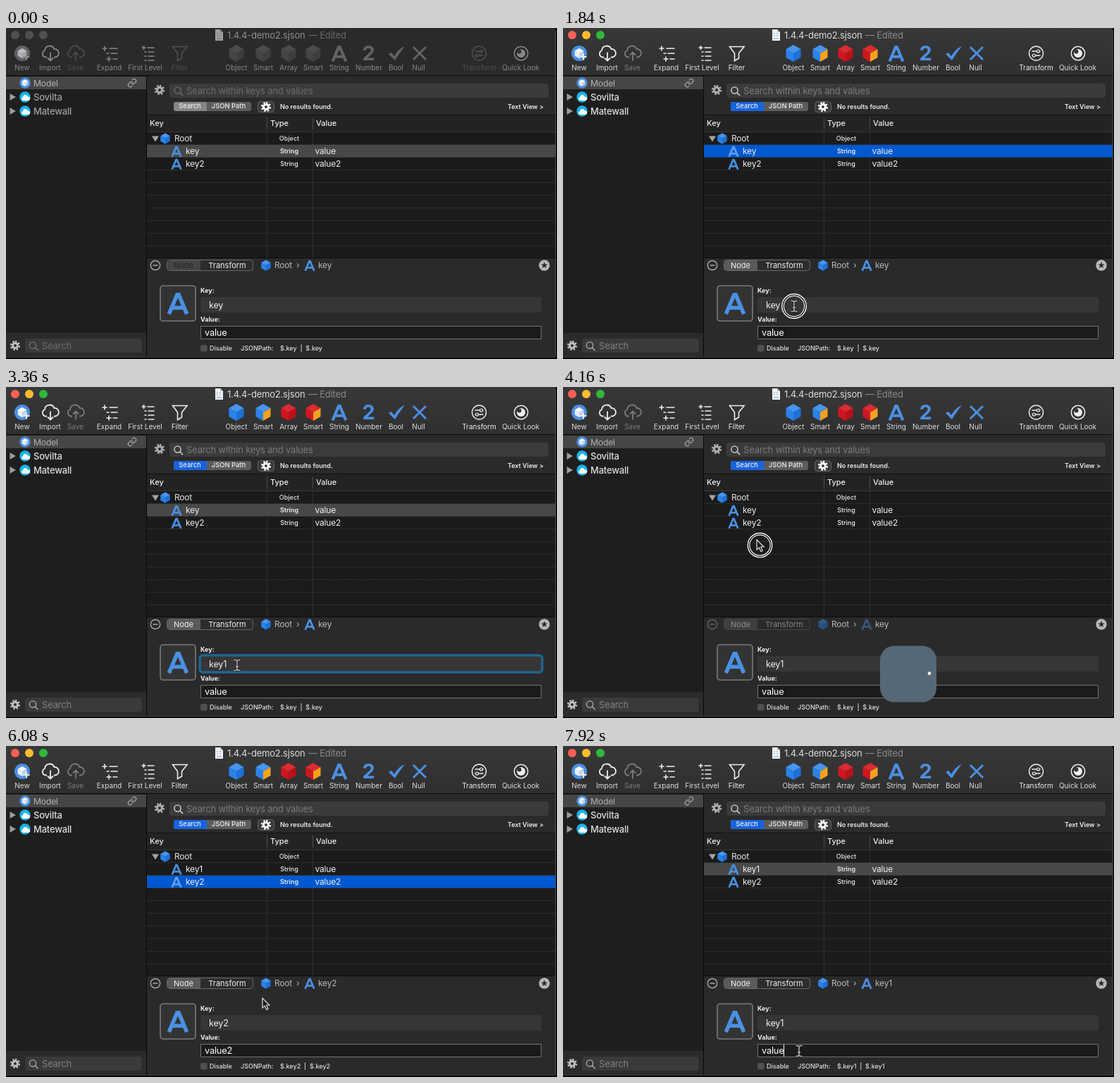
Animation, 782 px wide and 470 px high, one loop 8 s. Source, as an HTML page with a canvas:

```html
<!DOCTYPE html>
<html lang="en">
<head>
<meta charset="utf-8">
<title>Key editor</title>
<style>
html, body { margin: 0; width: 100%; height: 100%; overflow: hidden; background: #000; }
canvas { display: block; }
</style>
</head>
<body>
<canvas id="stage" width="782" height="470"></canvas>
<script>
const g = document.getElementById('stage').getContext('2d');
const LOOP = 8000, STEP = 80;
const BLUE = '#4a90e2', ROW = '#484848';
const CUBE_BLUE = ['#4596f0', '#2a83ea', '#1f70d8'];
const CUBE_RED = ['#dc2b31', '#d0161f', '#b8121a'];
const CUBE_GREY = ['#4b4b4b', '#444', '#3e3e3e'];

// Pointer stops: time, x, y
const STOPS = [
  [160, 427, 398], [640, 303.5, 175.5], [1040, 303.5, 175.5], [1760, 328, 395],
  [2560, 328, 395], [2960, 338, 392], [3360, 328, 395], [3600, 328, 395],
  [4000, 275, 217], [4160, 275, 217], [4480, 280, 187], [4960, 280, 187],
  [5280, 345, 413], [5440, 343, 422], [5680, 338, 400], [5840, 338, 400],
  [6720, 480, 170], [6960, 480, 170], [7600, 335, 433]
];
const CLICKS = [[800, 880], [1840, 2000], [4160, 4320], [4800, 4880], [6800, 6960], [7680, 7840]];
const BUSY = [[4160, 4400], [6880, 7120]];
const within = (t, spans) => spans.find(([a, b]) => t >= a && t < b);

// Drawing helpers
function rect(x, y, w, h, fill) {
  g.fillStyle = fill;
  g.fillRect(x, y, w, h);
}
function box(x, y, w, h, r, fill, edge, lw = 1) {
  g.beginPath();
  g.roundRect(x, y, w, h, r);
  if (fill) { g.fillStyle = fill; g.fill(); }
  if (edge) { g.strokeStyle = edge; g.lineWidth = lw; g.stroke(); }
}
function disc(x, y, r, fill, edge, lw = 1) {
  box(x - r, y - r, 2 * r, 2 * r, r, fill, edge, lw);
}
function shape(d, x, y, fill, edge, lw = 1) {
  const path = new Path2D(d);
  g.save();
  g.translate(x, y);
  if (fill) { g.fillStyle = fill; g.fill(path); }
  if (edge) { g.strokeStyle = edge; g.lineWidth = lw; g.stroke(path); }
  g.restore();
}
const pen = (d, x, y, color, lw) => shape(d, x, y, null, color, lw);
function text(s, x, y, size, color = '#e4e4e4', weight = 400, align = 'left') {
  g.font = `${weight} ${size}px Inter, "Liberation Sans", sans-serif`;
  g.letterSpacing = size > 11 ? '-0.2px' : '0px';
  g.textAlign = align;
  g.fillStyle = color;
  g.fillText(s, x, Math.round(y + size * 0.36));
  return g.measureText(s).width;
}
function faded(alpha, paint) {
  g.save();
  g.globalAlpha = alpha;
  paint();
  g.restore();
}

// Icons
function cube(x, y, r, [top, left, right]) {
  const w = r * 0.88, h = r / 2;
  shape(`M0 ${-r}L${w} ${-h}L0 0L${-w} ${-h}Z`, x, y, top);
  shape(`M${-w} ${-h}L0 0V${r}L${-w} ${h}Z`, x, y, left);
  shape(`M${w} ${-h}L0 0V${r}L${w} ${h}Z`, x, y, right);
}
function letterA(x, y, r, color = BLUE) {
  const k = r * 0.87;
  pen(`M${-k} ${r}L${-r * 0.08} ${-k}H${r * 0.08}L${k} ${r}M${-k * 0.55} ${r * 0.4}H${k * 0.55}`, x, y, color, r * 0.38);
}
function gear(x, y, r, color, hole) {
  g.save();
  disc(x, y, r * 0.72, color);
  g.setLineDash([2 * Math.PI * r * 0.84 / 16]);
  disc(x, y, r * 0.84, null, color, r * 0.36);
  g.restore();
  disc(x, y, r * 0.28, hole);
}
function lens(x, y, color) {
  disc(x - 1, y - 1, 4.6, null, color, 1.3);
  pen('M2.5 2.5L6.5 6.5', x, y, color, 1.5);
}
function modelIcon(x, y, r, color) {
  disc(x, y, r, color);
  cube(x, y, r * 0.65, ['#fff', '#e8eef6', '#c6d3e4']);
}
function remoteIcon(x, y) {
  disc(x, y, 7.7, '#1ab4e8');
  shape('M-4 4a2.6 2.6 0 0 1 0-5a3.6 3.6 0 0 1 7-.5a2.8 2.8 0 0 1 1 5.5Z', x + 1, y + 1, '#fff');
}
const CLOUD = 'M-5 5H-7a5 5 0 0 1-1-9.5a7 7 0 0 1 13.5-2a5.8 5.8 0 0 1 1.5 11.5H5';
const LINK = 'M-1.1 .5a2.8 2.8 0 0 0 4.2 .3l1.7-1.7a2.8 2.8 0 0 0-4-4l-1 1' +
  'M1.1-.5a2.8 2.8 0 0 0-4.2-.3l-1.7 1.7a2.8 2.8 0 0 0 4 4l1-1';

function toolbar(on) {
  const pick = (a, b) => on ? a : b;
  const fill = g.createLinearGradient(0, 0, 0, 67);
  fill.addColorStop(0, pick('#393839', '#2a2a2a'));
  fill.addColorStop(1, pick('#302f30', '#2a2a2a'));
  rect(0, 0, 780, 67, fill);
  rect(0, 67, 780, 1, '#0c0c0c');

  ['#ff5f57', '#febc2e', '#2fb93a'].forEach((c, i) => disc(13 + 20 * i, 10, 6, pick(c, '#505050')));
  shape('M-5-8H2L6-4V8H-5Z', 302, 10, pick('#f2f2f2', '#a0a0a0'));
  shape('M2-8V-4H6Z', 302, 10, pick('#b9c4d0', '#777'));
  pen('M-3-2h2M1-2h2M-3 1h2M1 1h2M-3 5h7', 302, 10, pick('#6e9fd6', '#666'), 1.2);
  text('1.4.4-demo2.sjson', 314, 10, 13, pick('#dcdcdc', '#8e8e8e'));
  text('— Edited', 429, 10, 13, pick('#8a8a8a', '#666'));

  const ink = pick('#eee', '#888'), dim = pick('#eee', '#505050'), off = pick('#7c7c7c', '#4c4c4c');
  const blue = pick(BLUE, '#636363');
  [['New', 23], ['Import', 62.5], ['Save', 98.5, off], ['Expand', 146.5], ['First Level', 197.5],
   ['Filter', 246.5, dim], ['Object', 327], ['Smart', 365], ['Array', 401], ['Smart', 436],
   ['String', 473], ['Number', 515], ['Bool', 553.5], ['Null', 585.5],
   ['Transform', 671.5, dim], ['Quick Look', 730.5]
  ].forEach(([s, x, c]) => text(s, x, 56, 10, c || pick('#dedede', '#888'), 400, 'center'));

  faded(pick(1, 0.6), () => modelIcon(23, 36, 11, pick(BLUE, '#888')));
  pen('M-4.5 0h9M0-4.5v9', 29, 41, ink, 2);
  pen(CLOUD + 'M0-2V10M-4 6L0 10L4 6', 63, 36.5, ink, 1.8);
  pen(CLOUD + 'M0 10V-2M-4 2L0-2L4 2', 99, 36.5, off, 1.8);
  pen('M-11-7h7M-7.5-10.5v7M-1-7h12M-5 0h4M1 0h10M-5 8h7M-1.5 4.5v7M4 8h7', 147.5, 36, ink, 1.6);
  pen('M-8-8h6M-5-11v6M0-8h10M-4-2h3M1-2h9M-4 4h3M1 4h9M-4 10h3M1 10h9', 200.5, 36, ink, 1.6);
  pen('M-10-9.5H10.5L3 0V7L-3 10.5V0Z', 246.5, 36, dim, 1.6);

  const mixed = base => [base[0], base[1], '#f5a11f'];
  cube(327, 36, 12, pick(CUBE_BLUE, CUBE_GREY));
  cube(365, 36, 12, pick(mixed(CUBE_BLUE), CUBE_GREY));
  cube(401, 36, 12, pick(CUBE_RED, CUBE_GREY));
  cube(436, 36, 12, pick(mixed(CUBE_RED), CUBE_GREY));
  letterA(473, 36.5, 10.8, blue);
  text('2', 514.5, 36, 29, blue, 700, 'center');
  shape('M-11 1L-7-1L-3 4C1-3 6-8 12-10C7-4 2 3-2 10Z', 554, 36, blue);
  pen('M-9-9L9 9M9-9L-9 9', 587, 36, blue, 3);

  disc(671.5, 36, 10, null, dim, 1.4);
  pen('M-6-3H6M-6 3H6', 671.5, 36, dim, 1.4);
  disc(674.5, 33, 2, '#333', dim, 1.2);
  disc(668.5, 39, 2, '#333', dim, 1.2);
  disc(731, 36, 9.7, null, ink, 1.5);
  disc(731, 36, 6, ink);
  disc(728.5, 33.5, 3, '#333');
}

function sidebar(on) {
  rect(0, 68, 199, 365, '#1e1e1e');
  rect(0, 69, 199, 18, '#464646');
  modelIcon(27, 78, 7.7, BLUE);
  text('Model', 39, 78.5, 12.2, '#b0b0b0');
  pen(LINK, 179, 78, '#a4a4a4', 1.3);
  ['Sovilta', 'Matewall'].forEach((s, i) => {
    const y = 98 + 20 * i;
    shape('M-3.5-5L5 0L-3.5 5Z', 9, y, '#9c9c9c');
    remoteIcon(27, y);
    text(s, 39, y + 0.5, 13, on ? '#dedede' : '#a0a0a0', 500);
  });
  rect(0, 433, 199, 34, '#2b2b2b');
  gear(13, 451, 7, '#c0c0c0', '#2b2b2b');
  box(27, 441, 166, 20, 4, '#3a3a3a');
  lens(39, 451.5, on ? '#b0b0b0' : '#777');
  text('Search', 51, 451, 13, on ? '#808080' : '#6c6c6c');
  rect(199, 68, 1, 399, '#080808');
}

function searchBar(on) {
  rect(200, 68, 580, 56, '#2a2a2a');
  gear(218, 88, 7.2, '#acacac', '#2a2a2a');
  box(232, 79, 538, 20, 4, '#3b3b3b');
  lens(244.5, 89.5, on ? '#e0e0e0' : '#707070');
  text('Search within keys and values', 256, 89.5, 13, on ? '#7a7a7a' : '#6c6c6c');
  box(238, 105, 110, 13, 3, '#5c5c5c');
  box(238, 105, 47, 13, [3, 0, 0, 3], on ? '#1763dd' : '#868686');
  text('Search', 261, 111, 9.4, '#f0f0f0', 500, 'center');
  text('JSON Path', 316, 111, 9.4, '#f0f0f0', 500, 'center');
  box(357.5, 104.5, 23, 15, 4, '#3a3a3a', '#666');
  gear(369, 112, 7, '#fff', '#3a3a3a');
  text('No results found.', 389, 112, 9, '#eee', 600);
  text('Text View >', 763, 112, 9, '#eee', 600, 'right');
}

function table(s) {
  rect(200, 124, 580, 202, '#1b1b1b');
  rect(200, 124, 580, 23, '#232323');
  rect(200, 123, 580, 1, '#111');
  rect(200, 147, 580, 1, '#383838');
  [['Key', 204], ['Type', 375], ['Value', 440]].forEach(([h, x]) => text(h, x, 135.5, 11, '#eee', 500));
  rect(370, 127, 1, 17, '#4c4c4c');
  rect(435, 127, 1, 17, '#4c4c4c');
  g.save();
  g.setLineDash([1, 1]);
  for (let y = 165.5; y < 320; y += 18) pen('M200 0H780', 0, y, '#3c3c3c', 1);
  g.restore();
  rect(370, 148, 1, 178, '#303030');
  rect(435, 148, 1, 178, '#303030');
  if (s.row) rect(200, 148 + 18 * s.row, 580, 17.5, s.blueRow ? '#0058d0' : ROW);

  shape('M-5-3.5H5L0 4.5Z', 212, 157, '#a4a4a4');
  cube(226, 157, 7.7, CUBE_BLUE);
  text('Root', 239, 157, 12);
  text('Object', 402, 157, 9, '#e4e4e4', 500, 'center');
  [[s.key1, 'value'], ['key2', 'value2']].forEach(([key, value], i) => {
    const y = 175 + 18 * i, picked = s.row === i + 1;
    letterA(242, y + 0.5, 7.3, picked && s.blueRow ? '#5f9df0' : BLUE);
    text(key, 255, y, 12, '#f0f0f0');
    text('String', 402, y, 9, '#f0f0f0', picked ? 600 : 500, 'center');
    text(value, 438.5, y, 12, '#f0f0f0');
  });
}

function caret(x, y) { rect(Math.round(x), y, 1, 17, '#fff'); }

function details(t, s) {
  const second = s.node === 2;
  const name = second ? 'key2' : s.key1;
  rect(200, 326, 580, 141, '#2a2a2a');
  rect(200, 326, 580, 1, '#0c0c0c');

  faded(s.busy ? 0.45 : 1, () => {
    disc(212, 337, 6.7, null, '#b8b8b8', 1.2);
    pen('M-3.5 0h7', 212, 337, '#b8b8b8', 1.3);
    box(228.5, 329.5, 122, 15, 4, '#2c2c2c', '#686868');
    box(229, 330, 47, 14, [3, 0, 0, 3], s.on ? '#5a5a5a' : '#454545');
    text('Node', 252, 337, 11, s.on ? '#f0f0f0' : '#242424', 400, 'center');
    text('Transform', 314, 337, 11, '#f0f0f0', 400, 'center');
    cube(369, 337, 7.7, CUBE_BLUE);
    letterA(431, 337.5, 7.3);
  });
  text('Root', 381, 337, 12, '#b8b8b8');
  text('›', 412, 337, 12, '#b8b8b8');
  text(name, 443, 337, 12, '#b8b8b8');
  disc(764, 337, 7.7, '#b8b8b8');
  shape('M0-5L1.3-1.6L4.8-1.5L2 .6L3 4L0 2L-3 4L-2 .6L-4.8-1.5L-1.3-1.6Z', 764, 337, '#2a2a2a');

  box(219, 366, 50, 50, 4, '#333', '#7a7a7a', 1.6);
  letterA(244, 391.5, 14.6);

  text('Key:', 276, 373, 9, '#eee', 700);
  box(276, 382, 484, 22, 3, '#363636');
  if (t >= 1920 && t < 4160) {
    const grow = Math.min(1, (t - 1840) / 240), pad = 1 + 4 * (1 - grow);
    faded(grow, () => box(276 - pad, 382 - pad, 484 + 2 * pad, 22 + 2 * pad, 4, null, '#22648f', 3.4));
  }
  const keyWidth = text(second ? 'key2' : t < 2880 ? 'key' : 'key1', 288, 393.5, 12.6, '#f0f0f0');
  if (within(t, [[1920, 2480], [2640, 3360]])) caret(288 + keyWidth, 384);

  text('Value:', 276, 413.5, 9, '#eee', 700);
  box(276.5, 423.5, 483, 18, 0, '#1b1b1b', '#747474');
  const valueWidth = text(second ? 'value2' : 'value', 282, 432.5, 12.8, '#fff');
  if (t >= 7760) caret(282 + valueWidth, 424);

  box(276, 450, 9.5, 9.5, 2, '#505050');
  text('Disable', 289, 455, 9, '#e0e0e0', 500);
  text('JSONPath:', 333, 455, 9, '#e0e0e0', 500);
  text(`$.${name}  |  $.${name}`, 389, 455, 9, '#e0e0e0', 500);
}

function spinner(age) {
  box(450, 367.6, 80, 80, 20, '#566876');
  g.save();
  g.beginPath();
  g.arc(490, 406.5, 30, age / 400, age / 160 + 0.01);
  g.lineCap = 'round';
  g.lineWidth = 4.6;
  g.strokeStyle = '#fff';
  g.stroke();
  g.restore();
}

function pointer(t) {
  if (t < STOPS[0][0]) return;
  const next = STOPS.findIndex(s => s[0] > t);
  const b = STOPS[next < 0 ? STOPS.length - 1 : next];
  const a = next < 0 ? b : STOPS[next - 1];
  const p = a === b ? 0 : (t - a[0]) / (b[0] - a[0]);
  const e = p * p * (3 - 2 * p);
  const x = a[1] + (b[1] - a[1]) * e, y = a[2] + (b[2] - a[2]) * e;
  const beam = x > 276 && (y > 382 && y < 404 || y > 423 && y < 442);

  if (within(t, CLICKS)) {
    const cx = beam ? x : x + 4.5, cy = beam ? y : y + 7.7;
    disc(cx, cy, 15.8, null, '#000', 4);
    disc(cx, cy, 17.2, null, '#fff', 1.4);
    disc(cx, cy, 14.6, null, '#fff', 1.2);
  }
  if (beam) {
    const d = 'M-4.5-7.5Q0-8 0-5Q0-8 4.5-7.5M0-5V5M-4.5 7.5Q0 8 0 5Q0 8 4.5 7.5M-2 2H2';
    pen(d, x, y, '#222', 3.4);
    pen(d, x, y, '#b8b8b8', 1.4);
  } else {
    shape('M0 0V14L3.3 11L5.8 16.5L8.2 15.4L5.8 10H10Z', x, y, '#1c1c1c', '#dcdcdc', 1.2);
  }
}

function render(t) {
  const busy = within(t, BUSY);
  const s = {
    on: t >= 800,
    busy,
    key1: t < 4400 ? 'key' : 'key1',
    node: t >= 4800 && t < 7120 ? 2 : 1,
    blueRow: t >= 800 && t < 1920 || t >= 4160 && t < 7680
  };
  s.row = t >= 4160 && t < 4400 ? 0 : s.node;

  rect(0, 0, 782, 470, '#000');
  toolbar(s.on);
  sidebar(s.on);
  searchBar(s.on);
  table(s);
  details(t, s);
  rect(779.5, 4, 1, 463, '#585858');
  rect(0, 467, 780, 0.7, '#585858');
  if (busy) spinner(t - busy[0]);
  pointer(t);
}

const start = performance.now();
function tick() {
  const t = (performance.now() - start) % LOOP;
  render(Math.floor(t / STEP) * STEP);
  requestAnimationFrame(tick);
}
tick();
</script>
</body>
</html>
```
